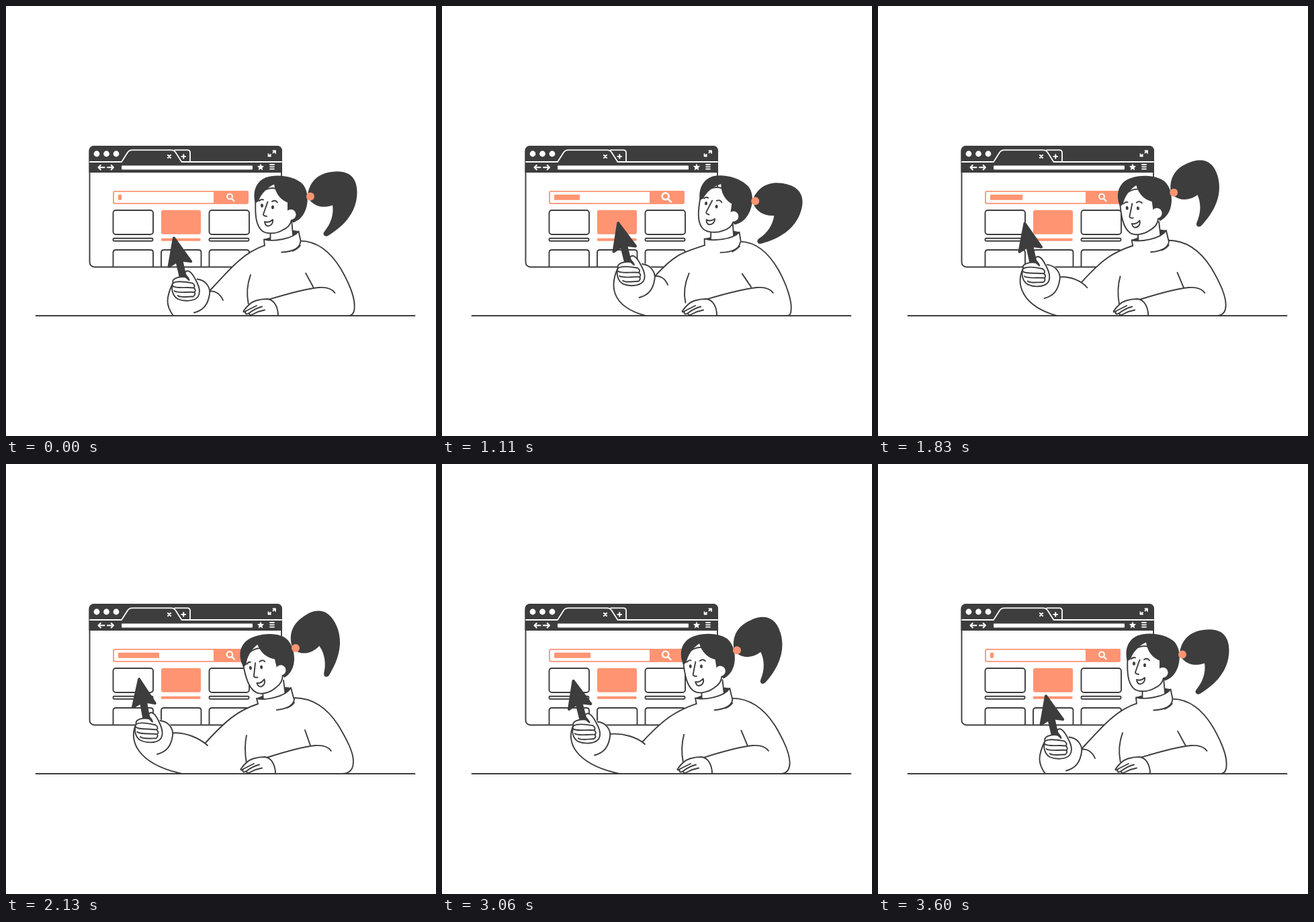
These frames come from a looping animation (640x640 px, 3630 ms). An HTML page:

```html
<!DOCTYPE html>
<html lang="en">
<head>
<meta charset="utf-8">
<title>Search illustration</title>
<style>
html, body { margin: 0; width: 100%; height: 100%; overflow: hidden; background: #fff; }
svg { display: block; width: 100vw; height: 100vh; }
.l { fill: none; stroke: #3d3d3d; stroke-width: 1.9; stroke-linecap: round; stroke-linejoin: round; }
.w { fill: #fff; }
.d { fill: #3d3d3d; }
.o { fill: #ff9472; }
.wl { fill: none; stroke: #fff; stroke-width: 1.8; stroke-linecap: round; stroke-linejoin: round; }
.l.w { fill: #fff; }
.bold { stroke-width: 2.1; }
</style>
</head>
<body>
<svg viewBox="0 0 640 640">
  <!-- browser window -->
  <rect x="124.5" y="209" width="285.5" height="179.5" rx="7" class="l w"/>
  <path class="d" d="M123.5 248V216Q123.5 208 131.5 208H403Q411 208 411 216V248Z"/>
  <g class="w">
    <circle cx="135" cy="220" r="4.4"/><circle cx="149.5" cy="220" r="4.4"/><circle cx="164" cy="220" r="4.4"/>
    <rect x="172" y="237.600" width="195" height="6" rx="1"/>
    <path id="star"/>
  </g>
  <g class="wl">
    <path d="M125 232H172L181 218Q183.500 214.300 188 214.300H246Q250 214.300 252.500 218L261.500 232H410"/>
    <path d="M251 214.300H270Q274 214.300 274 218.300V232"/>
    <path class="bold" d="M241 222l4 4m0-4l-4 4M261.500 224h5.500m-2.750-2.750v5.500"/>
    <path d="M397.500 218.500l3.500-3m-3.500 0h3.500v3.500M394 221l-3.500 2.500m0-3.300v3.300h3.500"/>
    <path class="bold" d="M146.500 240.300h-9m3.300-3.300l-3.300 3.300 3.300 3.300M151 240.300h9m-3.300-3.300l3.300 3.300-3.300 3.300"/>
    <path d="M393 236h6m-6 3.300h6m-6 3.300h6"/>
  </g>
  <rect x="160" y="275.800" width="200" height="18" rx="2" fill="#fff" stroke="#ff9472" stroke-width="1.800"/>
  <path class="o" d="M309 275H359Q361 275 361 277V292.600Q361 294.600 359 294.600H309Z"/>
  <rect id="query" class="o" x="167" y="280.800" height="8" rx="1"/>
  <g id="lens" class="wl bold"><circle cx="333" cy="283.600" r="3.900"/><path d="M336 286.700l3.500 3.500"/></g>
  <g id="cards" class="l"></g>
  <rect class="o" x="231" y="303.800" width="59" height="36" rx="3"/>
  <rect class="o" x="231" y="345.700" width="58.500" height="4" rx="1"/>

  <!-- body -->
  <path id="bodyFill" class="w"/>
  <path id="shoulders" class="l"/>
  <path id="folds" class="l"/>
  <path id="rim" class="d"/>
  <path id="neck" class="l w"/>
  <path id="collar" class="l w"/>
  <g id="rest">
    <path class="w" d="M404 461H362L353 457 355 451 365 441 387 436Q403 440 404 461Z"/>
    <path class="l" d="M372 446L356 454Q352 457 352.500 454C356 449 363 441 371 438.500Q379 436 388 436C398 437 404 448 404 461M356 454C354 460 358 459 361 457Q370 450 380 447.500M361 457Q361 462 367 458.500Q375 454 384 452.500"/>
  </g>
  <path id="armFill" class="w"/>
  <path id="arm" class="l"/>

  <!-- head -->
  <g id="tail">
    <path class="d" d="M449 281C451 263 463 249 484 246.500C506 243 522 251 522.500 276C523 306 503 327 480 341C475 344.500 470 340 474 335C484 323 488 309 486 296C472 301 459 298 451 287Z"/>
  </g>
  <g id="head">
    <path class="l w" d="M371.500 288C370.500 310 372 324 379 332C385 340 401 339 411 333.500C419 330 423 326 425 318L425 285Q400 260 378 278Z"/>
    <path class="d" d="M371 293C367 279 370 262 386 255C402 249 428 252 441 264C452 276 450 298 443 309C439 316 433 320 427 322L419 310V292C409 288 401 279 399 265C388 270 379 280 376 290Z"/>
    <circle class="w" cx="424" cy="310" r="7.600"/>
    <path class="l" d="M389.500 291L383 309.500Q383 312 388 312.500M377 289.500Q380 286.500 383 288M396 290.500Q401 287.500 404 292"/>
    <ellipse class="d" cx="381" cy="296.500" rx="2" ry="2.800"/><ellipse class="d" cx="397" cy="299" rx="2" ry="2.800"/>
    <path class="l" d="M385 320.500Q391 323 397 317.500C398 324 393 327.500 389 327Q385.500 326 385 320.500Z"/>
  </g>
  <circle id="tie" class="o" r="6"/>

  <!-- raised hand with pointer -->
  <g id="hand">
    <path class="w" d="M-19 -5L18 -12C34 -10 39 3 36 13C34 28 27 37 13 39L-8 36Z"/>
    <path class="l" d="M18 -10.500C32 -9 38 3 36.500 12C34 28 27 36 13.500 39.500"/>
    <g id="grip">
      <g transform="rotate(-13)">
        <path class="d" d="M0 -73.500L-16.700 -34 -3.500 -39V-8H3.500V-39L16.700 -34Z" stroke="#3d3d3d" stroke-width="4" stroke-linejoin="round"/>
      </g>
      <path class="l w" d="M-18 -5C-20 -11 -10 -15 1 -13.500L6 -9C6 -14 -3 -17 1 -21.500C6 -26 12 -17 16 -9C21 0 24 9 19 16C13 23 -2 23 -11 19C-19 14 -21 4 -18 -5Z"/>
      <path class="l" d="M-17 -5C-10 -9 3 -6 11 -4.500M-18 0C-13 4 2 1 13 2.500M-16 7C-11 11 3 8 14 9M-11 14C-6 18 5 15 12 15.500M11 -4.500Q16 -1 13 2.500 17 6 14 9 16 13 12 15.500"/>
    </g>
  </g>
  <path class="l" d="M44.500 461H608.500"/>
</svg>
<script>
const $ = id => document.getElementById(id);
const LOOP = 3630, STEP = 30, SPAN = 3600;

// time, lean, hand x, y, grip angle, sleeve foot x, sleeve bend x, crease x, y, elbow x, y, query width
const poses = [
  [0, .55, 266.5, 417, -13, 249, 238, 323, 438, 304, 423, 5],
  [540, 1, 279.5, 394.5, -5, 296, 246, 334, 418, 317, 403, 26],
  [1110, .88, 280, 394.5, -14, 303, 248, 336, 415, 317, 402, 38],
  [1590, .46, 252.5, 397.5, -13.5, 272, 229, 321, 419, 308, 408, 39],
  [2130, 0, 211.5, 392.5, -10.5, 262, 194, 300, 419, 296, 416, 61],
  [3060, .2, 213.5, 394, -14.2, 264, 196, 302, 417, 297, 415, 54]
];
const count = poses.length;

function row(i) {
  const turn = Math.floor(i / count), p = poses[i - turn * count];
  return [p[0] + turn * SPAN, ...p.slice(1)];
}

function slope(i, k) {
  const a = row(i - 1), b = row(i), c = row(i + 1);
  const h = b[0] - a[0], g = c[0] - b[0];
  return ((b[k] - a[k]) / h * g + (c[k] - b[k]) / g * h) / (h + g);
}

// Smooth periodic curve through the poses
function poseAt(t) {
  let i = count - 1;
  while (poses[i][0] > t) i--;
  const a = row(i), b = row(i + 1), h = b[0] - a[0], s = (t - a[0]) / h;
  const s2 = s * s, s3 = s2 * s;
  return a.map((v, k) => {
    const pull = h * (k === 1 ? 1 : .7);
    return (2 * s3 - 3 * s2 + 1) * v + (3 * s2 - 2 * s3) * b[k] +
      ((s3 - 2 * s2 + s) * slope(i, k) + (s3 - s2) * slope(i + 1, k)) * pull;
  }).slice(1);
}

// Blend two paths of equal structure
function mix(a, b, u) {
  const to = b.match(/-?[\d.]+/g);
  let i = 0;
  return a.replace(/-?[\d.]+/g, n => (+n + (to[i++] - n) * u).toFixed(2));
}

// Each pair: leaning left, leaning right
const shape = {
  side: ["C458 348 478 364 494 388C511 416 517 431 517 443C517 456 510 461 500 461",
         "C470 352 488 369 502 394C514 416 521 440 520 452C520 459 518 461 516 461"],
  folds: ["M358 404C355 417 356 434 358 446M388 437C410 430 440 421 460 419C473 418 480 421 484 427M445 396L453 419M429 349C429 359 420 364 403 366M429 355Q426 360 418 363",
          "M369 397C362 412 360 428 363 441M396 436C420 429 450 421 470 419C483 418 490 421 494 427M447 399L461 418M446 352C444 362 434 367 416 367M445 358Q440 363 434 366"],
  rim: ["M372 349L384 344 416 332 425 333 417 346 378 353Z",
        "M392 346L403 344 437 335 446 337 438 346 398 350Z"],
  neck: ["M382 338L383 353 416 345 413 322", "M403 330L402 350 437 346 435 318"],
  collar: ["M375 357L373 349C385 352 416 347 424 333L428 348",
           "M393 356L393 346C405 350 435 348 445 337L447 351"]
};
const blend = (name, u) => mix(...shape[name], u);
const setD = (id, d) => $(id).setAttribute("d", d);
const move = (id, v) => $(id).setAttribute("transform", v);

function buildWindow() {
  let out = "";
  for (const x of [159.5, 231, 302.5]) {
    if (x !== 231) {
      out += `<rect x="${x}" y="304" width="59.500" height="36" rx="4"/>` +
        `<rect x="${x}" y="345.800" width="59" height="4" rx="1.500"/>`;
    }
    out += `<path d="M${x} 388V367q0-4 4-4h51.500q4 0 4 4V388"/>`;
  }
  $("cards").innerHTML = out;
  let star = "";
  for (let i = 0; i < 10; i++) {
    const r = i % 2 ? 2.6 : 5.5, a = i * Math.PI / 5 - Math.PI / 2;
    star += `${i ? "L" : "M"}${379 + r * Math.cos(a)} ${240 + r * Math.sin(a)}`;
  }
  setD("star", star + "Z");
}

function draw(t) {
  const [u, hx, hy, grip, footX, bendX, cx, cy, ex, ey, width] = poseAt(t);

  // torso
  const nx = 375 + 18 * u, ny = 357 - u;
  const left = `M${ex} ${ey}C${ex + 32} ${ey - 35} ${nx - 30} ${ny + 10} ${nx} ${ny}`;
  const rx = 428 + 19 * u, ry = 348 + 3 * u, side = blend("side", u);
  setD("bodyFill", `${left}L${rx} ${ry}${side}H${ex}Z`);
  setD("shoulders", `${left}M${rx} ${ry}${side}`);
  for (const id of ["folds", "rim", "neck", "collar"]) setD(id, blend(id, u));
  move("rest", `translate(${-3 + 4 * u + 6 * u * u})`);

  // raised arm
  const sx = hx + 36, sy = hy + 8;
  const ax = sx + (cx - sx) * .38, bx = cx - (cx - sx) * .2;
  const sleeve = `M${hx - 18} ${hy - 5}C${hx - 29} ${hy + 18} ${bendX} 446 ${footX} 461`;
  setD("armFill", `${sleeve}H${cx}V${cy}C${bx} ${cy - 10} ${ax} ${sy - 2} ${sx} ${sy}Z`);
  setD("arm", `${sleeve}M${sx} ${sy}C${ax} ${sy - 2} ${bx} ${cy - 10} ${cx} ${cy}`);
  move("hand", `translate(${hx} ${hy})`);
  move("grip", `rotate(${grip + 13})`);

  // head and hair swing around the hair tie
  const tx = 431 + 40 * u, ty = 274 + 15 * u + 4 * u * u;
  const swing = deg => `translate(${tx} ${ty}) rotate(${deg * (u - .55)}) translate(-453 -283)`;
  move("head", swing(24));
  move("tail", swing(49));
  move("tie", `translate(${tx} ${ty})`);

  // search field
  $("query").setAttribute("width", Math.max(5, width));
  const zoom = 1 + .15 * (1 - Math.cos(t / SPAN * 4 * Math.PI));
  move("lens", `translate(334.500 285) scale(${zoom}) translate(-334.500 -285)`);
}

buildWindow();
let start;
function tick(now) {
  if (start === undefined) start = now;
  const t = (now - start) % LOOP;
  draw(Math.floor(t / STEP) * STEP % SPAN);
  requestAnimationFrame(tick);
}
draw(0);
requestAnimationFrame(tick);
</script>
</body>
</html>
```
